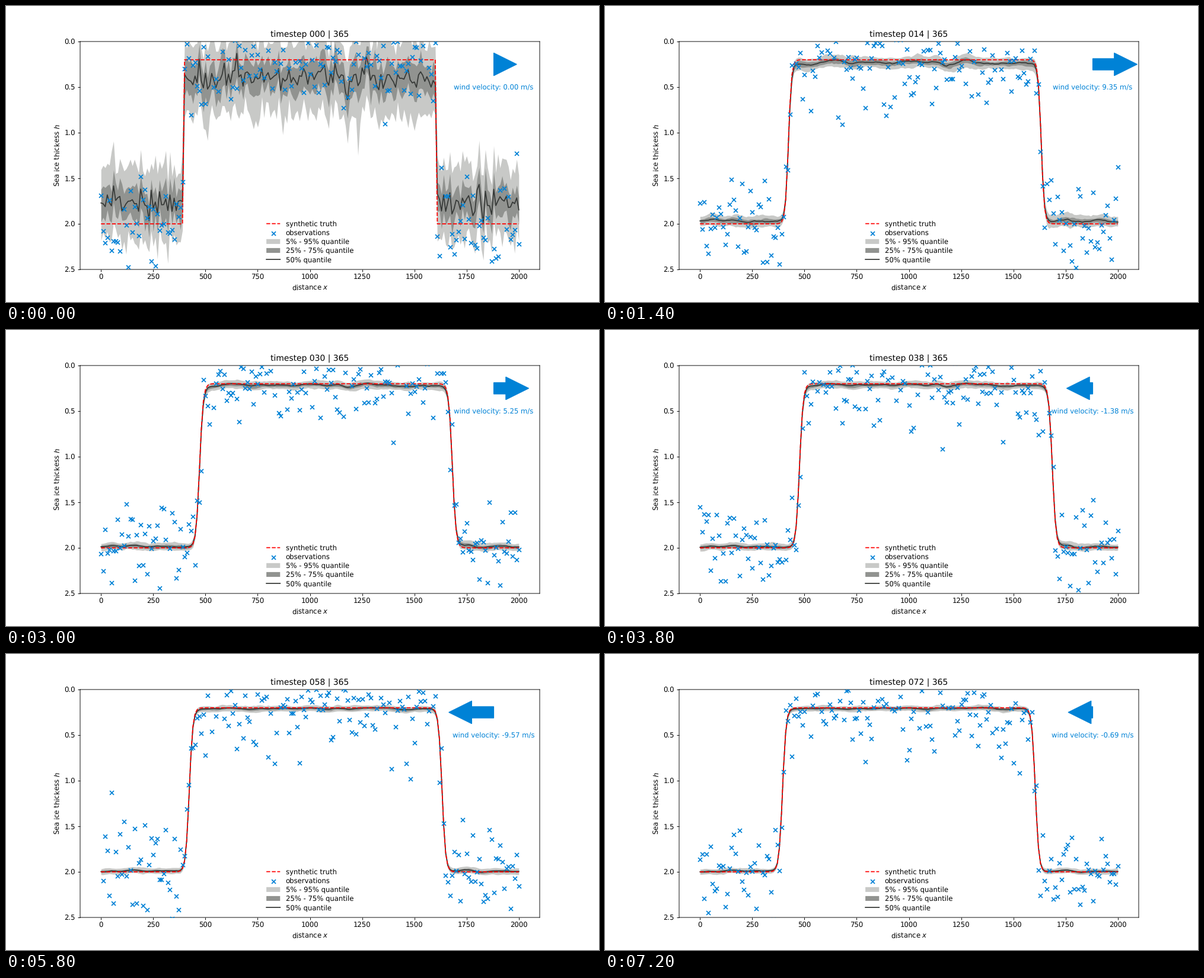
Recreate the animation shown at these times as a matplotlib script. Size 1000x500 px, loop 7.3 s.

```python
import numpy as np
import matplotlib.pyplot as plt
from matplotlib.animation import FuncAnimation

# Smooth, unsnapped rendering of glyphs and lines.
plt.rcParams.update({"path.snap": False, "text.hinting": "none"})

STEPS = 73
OMEGA = 10 * np.pi / 364
BLUE, LIGHT, DARK, INK = "#0082d6", "#c8c9c7", "#919390", "#353836"
THIN, THICK = 0.2, 2.0
MEMBERS = 60

x = np.arange(0, 2001, 10)
distance = np.subtract.outer(x, x) / 10
rng = np.random.default_rng(12)
noise_a, noise_b = rng.standard_normal((2, x.size, MEMBERS))


def wind(t):
    return 10 * np.sin(OMEGA * t)


def truth_profile(t):
    """Thin ice between two fronts that drift with the wind and soften."""
    shift = 41 * (1 - np.cos(OMEGA * (t + 0.5)))
    width = 1 + 16 * (1 - np.exp(-(t / 10) ** 2))
    plateau = (np.tanh((x - 395 - shift) / width)
               - np.tanh((x - 1605 - shift) / width)) / 2
    return THICK - (THICK - THIN) * plateau


def ensemble_quantiles(t, truth):
    """The ensemble tightens, smooths and loses its bias as data come in."""
    reach = max(2.5 * (1 - np.exp(-t / 4)), 0.1)
    kernel = np.exp(-0.5 * (distance / reach) ** 2)
    kernel /= np.linalg.norm(kernel, axis=1, keepdims=True)
    phase = t / 40
    noise = kernel @ (np.cos(phase) * noise_a + np.sin(phase) * noise_b)
    noise += 0.25 * noise[:, :1]  # error shared by all members
    spread = 0.26 / np.sqrt(1 + 2.6 * t)
    bias = np.interp(truth, [THIN, THICK], [0.19, -0.24]) / (1 + 0.4 * t)
    members = (truth + bias)[:, None] + spread * noise
    return np.percentile(members, [5, 25, 50, 75, 95], axis=1)


def observe(t, truth):
    return truth + 0.27 * np.random.default_rng(100 + t).standard_normal(x.size)


def band_vertices(low, high):
    return [np.column_stack([np.r_[x, x[::-1]], np.r_[low, high[::-1]]])]


fig, ax = plt.subplots(figsize=(12, 6), dpi=250 / 3)
ax.set(xlim=(-100, 2100), ylim=(2.5, 0), xticks=range(0, 2001, 250),
       xlabel="distance $x$", ylabel="Sea ice thickess $h$")

level = np.ones(x.size)
outer = ax.fill_between(x, level, level, color=LIGHT, lw=0,
                        label="5% - 95% quantile")
inner = ax.fill_between(x, level, level, color=DARK, lw=0,
                        label="25% - 75% quantile")
median, = ax.plot(x, level, color=INK, label="50% quantile")
truth_line, = ax.plot(x, level, "--", color="red", label="synthetic truth")
points = ax.scatter(x, level, marker="x", color=BLUE, zorder=3,
                    label="observations")
ax.legend(handles=[truth_line, points, outer, inner, median],
          loc="lower center", frameon=False, labelspacing=0.3)

arrow = ax.arrow(1880, 0.25, 1e-6, 0, width=0.125, head_width=0.25,
                 head_length=110, color=BLUE, zorder=4)
wind_text = ax.text(1880, 0.5, "", color=BLUE, ha="center", va="center",
                    zorder=4)
title = ax.set_title("")


def update(t):
    truth = truth_profile(t)
    q5, q25, q50, q75, q95 = ensemble_quantiles(t, truth)
    outer.set_verts(band_vertices(q5, q95))
    inner.set_verts(band_vertices(q25, q75))
    median.set_ydata(q50)
    truth_line.set_ydata(truth)
    points.set_offsets(np.column_stack([x, observe(t, truth)]))
    speed = wind(t)
    arrow.set_data(dx=11 * speed or 1e-6)  # a zero length has no direction
    wind_text.set_text(f"wind velocity: {speed:.2f} m/s")
    title.set_text(f"timestep {t:03d} | 365")
    return outer, inner, median, truth_line, points, arrow, wind_text, title


anim = FuncAnimation(fig, update, frames=STEPS, interval=100, repeat=True,
                     repeat_delay=0)
plt.show()
```
